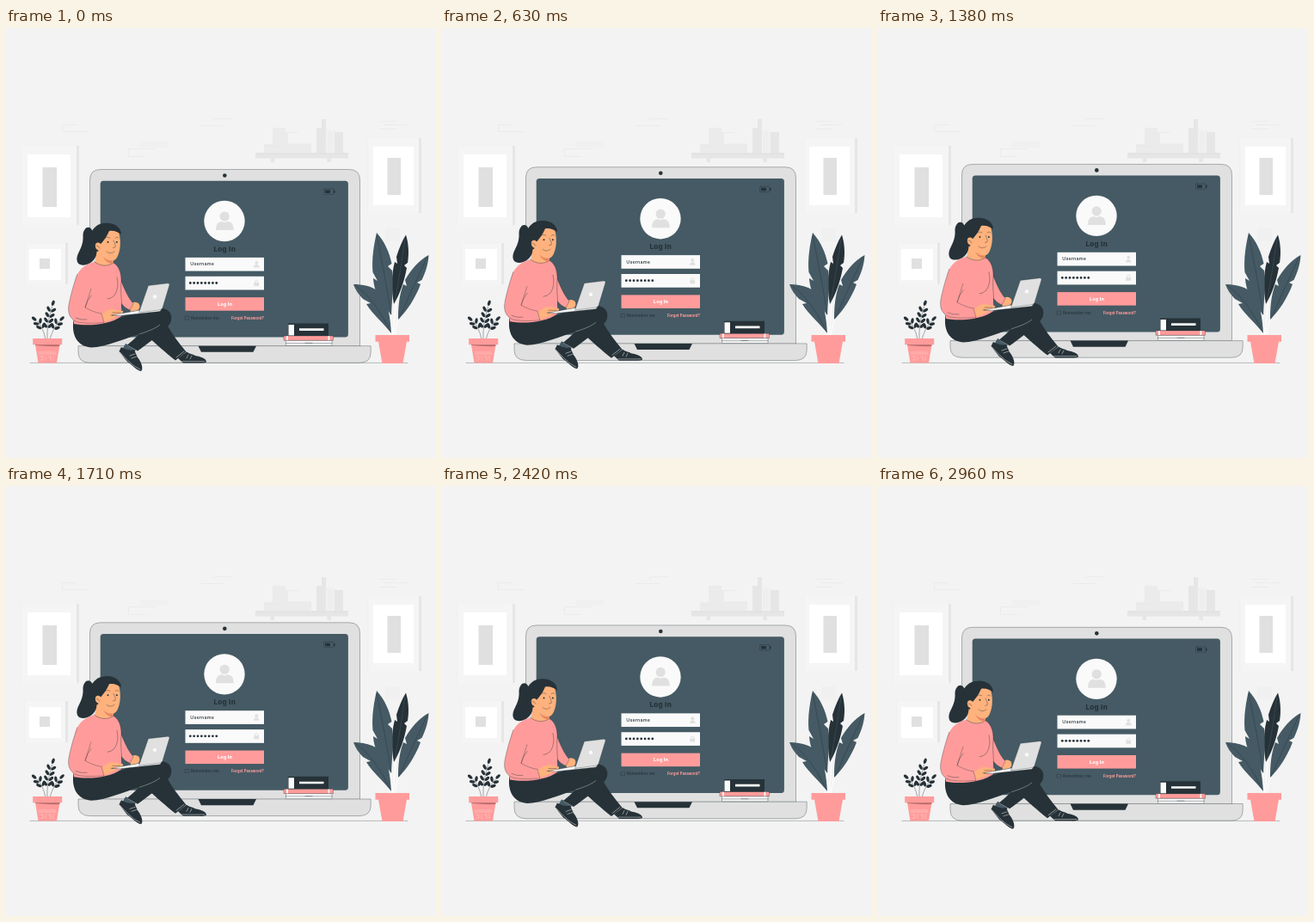
Animation, 500 px wide and 500 px high, one loop 3000 ms. Source, as an HTML page:

```html
<!DOCTYPE html>
<html lang="en">
<head>
<meta charset="utf-8">
<title>Log in</title>
<style>
html, body { margin: 0; width: 100%; height: 100%; overflow: hidden; background: #f3f3f3; }
svg { display: block; width: 100vw; height: 100vh; }
text { font-family: Inter, "Open Sans", sans-serif; }
.dark { fill: #263238; }
.slate { fill: #455a64; }
.pink { fill: #ff9c9b; }
.skin { fill: #ffb27d; }
.white { fill: #fafafa; }
.gray { fill: #e0e0e0; }
.line { fill: none; stroke: #263238; stroke-width: .4; stroke-linecap: round; stroke-linejoin: round; }
.edge { stroke: #263238; stroke-width: .35; stroke-linejoin: round; }
.vein { fill: none; stroke: #263238; stroke-width: .4; }
.light { fill: none; stroke: #f3f3f3; stroke-width: .5; stroke-linecap: round; }
.stem { fill: none; stroke: #fcfcfc; stroke-width: 1.4; }
.wall { fill: none; stroke: #e6e6e6; stroke-width: .6; }
</style>
</head>
<body>
<svg viewBox="0 0 500 500">
  <g id="wall">
    <path class="wall" d="M83 112.500H65.500V120.500H96M225 113.500H253M242 109V105.500H264M175 140.500H142.500V149.500H162M455 108.500H433.500M440 112.500H466M433.500 117.500H455"/>
    <path fill="#f0f0f0" d="M155 132H189V139H155ZM441 233H458V248H441Z"/>
    <g id="frames"></g>
    <g fill="#e6e6e6">
      <path d="M290 145.500H398V151.500H290ZM307.500 151.500H312V156H307.500ZM373.500 151.500H378V156H373.500Z"/>
      <path d="M361 116H367V145.500H361ZM367 106H372V145.500H367ZM382 121H392V145.500H382Z"/>
      <path fill="#ebebeb" d="M300 135H355V145.500H300ZM310 116H325V135H310ZM325 121H328V135H325Z"/>
      <path fill="#f0f0f0" d="M372 118H382V145.500H372Z"/>
      <path fill="#e0e0e0" d="M290 145.500H398V146.500H290Z"/>
      <path class="wall" d="M328 121.500H340M301 138H326M328 135H355M375 121V143M378 121V143M385 124H390"/>
    </g>
  </g>
  <path class="line" d="M28 389.400H467" opacity=".75"/>

  <g id="floating">
    <!-- big laptop -->
    <path class="gray edge" d="M97.500 370V177Q97.500 164.500 110 164.500H399Q411.500 164.500 411.500 177V370Z"/>
    <circle class="dark" cx="254.300" cy="171.500" r="2.300"/>
    <rect class="slate" x="109.700" y="177.700" width="288.200" height="181.800" rx="3.500"/>
    <path class="gray edge" d="M84 369.700H424.200V377Q424.200 389.300 411 389.300H98Q84 389.300 84 377Z"/>
    <path class="dark" d="M223.500 369.700H291L287.500 376.800H227Z"/>

    <!-- login form -->
    <rect class="line" x="369.500" y="187" width="11.500" height="6.500" rx="1"/>
    <path class="dark" d="M371 188.500H377V192H371ZM381 188.800H382.500V191.800H381Z"/>
    <circle class="white" cx="254" cy="224.500" r="23.700"/>
    <g class="gray">
      <circle cx="254.200" cy="219" r="5.600"/>
      <path d="M244 235Q244 225 251 225Q254.200 227 257.500 225Q264.800 225 264.800 235Z"/>
    </g>
    <text class="dark" x="254.300" y="260" font-size="8" font-weight="800" letter-spacing=".3" text-anchor="middle">Log In</text>
    <rect class="white" x="208.500" y="266.900" width="91.500" height="15.700"/>
    <text class="dark" x="214.300" y="276.500" font-size="5.400" font-weight="500" letter-spacing=".15">Username</text>
    <g class="gray">
      <circle cx="291.300" cy="272.800" r="1.900"/>
      <path d="M288 278.500Q288 275 291.300 275Q294.600 275 294.600 278.500Z"/>
    </g>
    <rect class="white" x="208.500" y="288.800" width="91.500" height="15.700"/>
    <g id="dots" class="dark"></g>
    <rect class="gray" x="288.300" y="296" width="5.800" height="4"/>
    <path d="M289.400 296V294.500Q291.200 291.700 293 294.500V296" fill="none" stroke="#e0e0e0"/>
    <rect class="pink" x="208.500" y="313.200" width="91.500" height="15.500"/>
    <text fill="#fff" x="254.500" y="322.900" font-size="5.400" font-weight="800" letter-spacing=".2" text-anchor="middle">Log In</text>
    <rect class="line" x="208.500" y="335.200" width="4" height="4"/>
    <text class="dark" x="215" y="339" font-size="4.600" font-weight="500" letter-spacing=".1">Remember me</text>
    <text class="pink" x="300" y="339" font-size="4.350" font-weight="700" text-anchor="end">Forgot Password?</text>

    <!-- books -->
    <path class="white edge" d="M325.500 363.300H379V369.300H325.500Z"/>
    <path class="line" d="M325.500 366.500H379M348 366.300H356"/>
    <path class="pink edge" d="M323 358H380.500V363.300H323Z"/>
    <path class="white" d="M326 358.300H328V363H326ZM374.500 358.300H376.300V363H374.500Z"/>
    <path class="dark" d="M328 343.500H375V358H328Z"/>
    <path class="white" d="M328.500 345H335V357.500H328.500ZM341 349.300H369.500V352H341Z"/>

    <!-- ponytail and neck -->
    <path class="dark" d="M100 235C97 229 90 232 89.500 241C90 249 88 254 85 260C80.500 268 82 275 88 275.500C97 277 105 269 107 259L111 243Z"/>
    <path class="skin" d="M106 258L103 274Q113 282 125 275L124 262Z"/>

    <!-- legs and shoes -->
    <path class="slate" d="M139 367L152 373L147 380L135 374Z"/>
    <path class="dark" d="M134 371C138 373 144 376 149 374L153 383C158 389 160 397 157 399C152 398 147 392 141 388L131.500 376Z"/>
    <path class="light" d="M132.500 377L142 387Q149 394 156 397M144 381L150 379M146 384L152 382"/>
    <path class="dark" d="M164 358C174 367 186 378 197 386.500L209.500 376.500C201 366 193 356 187 345Z"/>
    <path class="dark" d="M200 384L210 376.500C213 379 217 379 220 381C226 382 233 384 233 388.500Q231 390 224 389.500H206Z"/>
    <path class="light" d="M205 387.700H231M212 380L210 384M216 381L214 385M198 383L207 376"/>
    <path class="dark" d="M78.500 340C76 356 82 370 99 371.500C116 371 135 362 155 356C150 361 145 365 140.500 369L153 375.500C165 367 181 355 189 346C195 339 193 328 183 326C165 325 146 332 126 339Z"/>
    <path d="M155 356C164 353 173 350 179 345M141 369L152 375" fill="none" stroke="#e0e0e0" stroke-width=".4"/>

    <!-- sweater -->
    <path class="skin" d="M143 323Q149 316 154.500 320.500Q157 325 153 328.500L145 330Z"/>
    <path class="pink edge" d="M130 286C135 295 139 310 148 320.500L144 328C136 325 130 316 126 305Z"/>
    <path class="pink" d="M103 272C111 278 119 277 125 273C132 277 134.500 286 134 296C133 310 135 321 134 335C122 345 95 347 79 344C78 330 82 311 80 296C82 283 90 275 103 272Z"/>
    <path class="line" d="M125 273C132 277 134.500 286 134 296C133 309 135 318 134.500 326M103 272C111 278 119 277 125 273M129 290Q132 302 126 311Q122 315 118 315"/>
    <path class="skin" d="M111 334C117 328 124 325 129 328L136 329Q137 332 131 333Q125 339 113 342Z"/>
    <path class="line" d="M124 331L133 331M122 334L130 334"/>
    <path class="pink edge" d="M83 286C79 297 75 311 73 322C71 333 76 341 86 342.500C96 344 106 343 114 342.500L111 332C104 331 97 328 92 325L99 303"/>
    <path class="line" d="M92 325Q94 317 99 311M81 337Q87 340 94 339"/>

    <!-- small laptop -->
    <path class="white edge" d="M123 334L156 328L181 327L179 329.500L132 334.500Z"/>
    <path class="gray edge" d="M165.500 299.500L188 296.800Q190.500 296.800 190 299L182 325.500Q181 327.500 179 327.800L154.500 331Z"/>
    <circle class="white" cx="173" cy="312.500" r="2.200"/>

    <!-- head -->
    <path class="skin" d="M108 238C112 231 128 231 131.500 239C134 249 133 260 129 267C126 272 119 272 114 268C107 263 104 250 108 238Z"/>
    <path class="dark" d="M99 249C96 236 105 227 115.500 226.800C126 226 134 232 134 240C130 237 125 235 120 236C117 243 113 248 109.500 252L107 260C102 258 99 254 99 249Z"/>
    <path class="skin" d="M110 251C105 247 102 252 105 257Q108 260 111 258Z"/>
    <path class="line" d="M105 253Q108 253 109 256M125 247Q128 253 127 255L124.500 255.500M117 260Q121 264 126 260M115 244Q118 242 121 244M127 244Q129 242 131 244"/>
    <circle class="dark" cx="118.500" cy="249" r="1"/>
    <circle class="dark" cx="128.800" cy="249" r="1"/>
    <path d="M113 266Q118 271 124 270.500L124 274Q117 274 113 266Z" fill="#e98662"/>
  </g>

  <!-- large plant -->
  <g id="plant">
    <path class="stem" d="M447 322Q448 340 449 358M454 310Q452 335 450 358M461 328Q454 342 452 358M432 327Q444 340 447 358"/>
    <path class="dark" d="M451 321C448 304 448 287 452 272L455 274L454 266C457 256 461 247 465 240.500C468 250 469 262 467 273L463 276L466 279C463 295 458 309 451 321Z"/>
    <path class="slate" d="M448 334C439 321 428 310 427 291L432 294L426.500 284C425 268 428 251 431 238C440 248 446 261 448.500 274L444 277L449 282C450.500 300 449 316 448 334Z"/>
    <path class="slate" d="M456 339C456 325 457 311 462 298L466 300L464 293C471 281 480 270 491.500 264C491 274 488 284 483.500 293L478 296L482 298C476 314 467 328 456 339Z"/>
    <path class="slate" d="M448 355C440 344 427 334 419 321L424 320L415 315C410 310 406 304 404 298C414 298 425 300 433 306L432 310L436 308C444 318 447 337 448 355Z"/>
    <path class="vein" d="M431 241Q439 279 448 333M490 266Q474 299 457 338M406 299Q430 316 447 353"/>
    <path d="M464 245Q459 281 452 319" fill="none" stroke="#455a64" stroke-width=".5"/>
    <path class="pink" d="M429.500 357H469V364.800H429.500ZM433 364.800H466L461.500 390H437.500Z"/>
  </g>

  <!-- small plant -->
  <g id="sprigs"></g>
  <path class="pink" d="M31.200 361H65.200V368.300H31.200ZM34 368.300H62.500L59 389.500H37.500Z"/>
  <path d="M34 368.300H62.500L62.200 370Q48 370.500 34.300 369Z" fill="#b56b6b"/>
  <path d="M37.500 379H59M39 382H43V386H39M46 381V387M49 382H52V387M55 381V387M38 377H58" fill="none" stroke="#ffd0cf" stroke-width=".5"/>
</svg>
<script>
const LOOP = 3000, LIFT = 6.6;
const $ = id => document.getElementById(id);

function add(parent, tag, attrs) {
  const el = document.createElementNS("http://www.w3.org/2000/svg", tag);
  for (const key in attrs) el.setAttribute(key, attrs[key]);
  return parent.appendChild(el);
}

function box(parent, x, y, right, bottom, fill) {
  add(parent, "rect", { x, y, width: right - x, height: bottom - y, fill });
}

function pictureFrame(x, y, right, bottom, mat, art) {
  const g = $("frames");
  box(g, right, y, right + 3, bottom, "#e6e6e6");
  box(g, x, y, right, bottom, "#f5f5f5");
  add(g, "path", { d: `M${x} ${bottom}V${y}H${right}`, fill: "none", stroke: "#efefef", "stroke-width": .7 });
  box(g, ...mat, "#fff");
  box(g, ...art, "#e0e0e0");
}

// A curved stem with leaf pairs along it and one leaf at the tip.
function sprig(x0, y0, cx, cy, x1, y1, pairs) {
  const g = $("sprigs");
  add(g, "path", { class: "line", d: `M${x0} ${y0}Q${cx} ${cy} ${x1} ${y1}` });
  const leaf = (x, y, angle) => add(g, "ellipse", {
    class: "dark", cx: 4.4, rx: 3.3, ry: 1.7,
    transform: `translate(${x} ${y}) rotate(${angle})`
  });
  for (let i = 1; i <= pairs; i++) {
    const t = .2 + .8 * i / pairs, u = 1 - t;
    const x = u * u * x0 + 2 * u * t * cx + t * t * x1;
    const y = u * u * y0 + 2 * u * t * cy + t * t * y1;
    const dir = Math.atan2(u * (cy - y0) + t * (y1 - cy), u * (cx - x0) + t * (x1 - cx)) * 180 / Math.PI;
    if (i === pairs) leaf(x, y, dir);
    else { leaf(x, y, dir - 42); leaf(x, y, dir + 42); }
  }
}

pictureFrame(18, 137, 82, 229, [25, 147, 75, 220], [42.5, 162, 59, 208]);
pictureFrame(22, 250, 69, 298, [27, 257, 64, 293], [39, 268, 51, 280]);
pictureFrame(421, 128, 480, 215, [427, 138, 474, 206], [443.5, 151, 459, 194]);

for (let i = 0; i < 8; i++) add($("dots"), "circle", { cx: 214.3 + 4.35 * i, cy: 296.5, r: 1.4 });

sprig(46, 362, 43, 347, 36, 341, 3);
sprig(48, 362, 47, 345, 53.5, 324, 5);
sprig(51, 362, 55, 348, 62, 341, 3);

function draw(now) {
  const phase = now % LOOP / LOOP;
  const rise = LIFT * (1 - Math.abs(1 - 2 * phase));
  $("floating").setAttribute("transform", `translate(0 ${-rise})`);
}

const start = performance.now();
function tick() {
  draw(performance.now() - start);
  requestAnimationFrame(tick);
}
draw(0);
tick();
</script>
</body>
</html>
```
